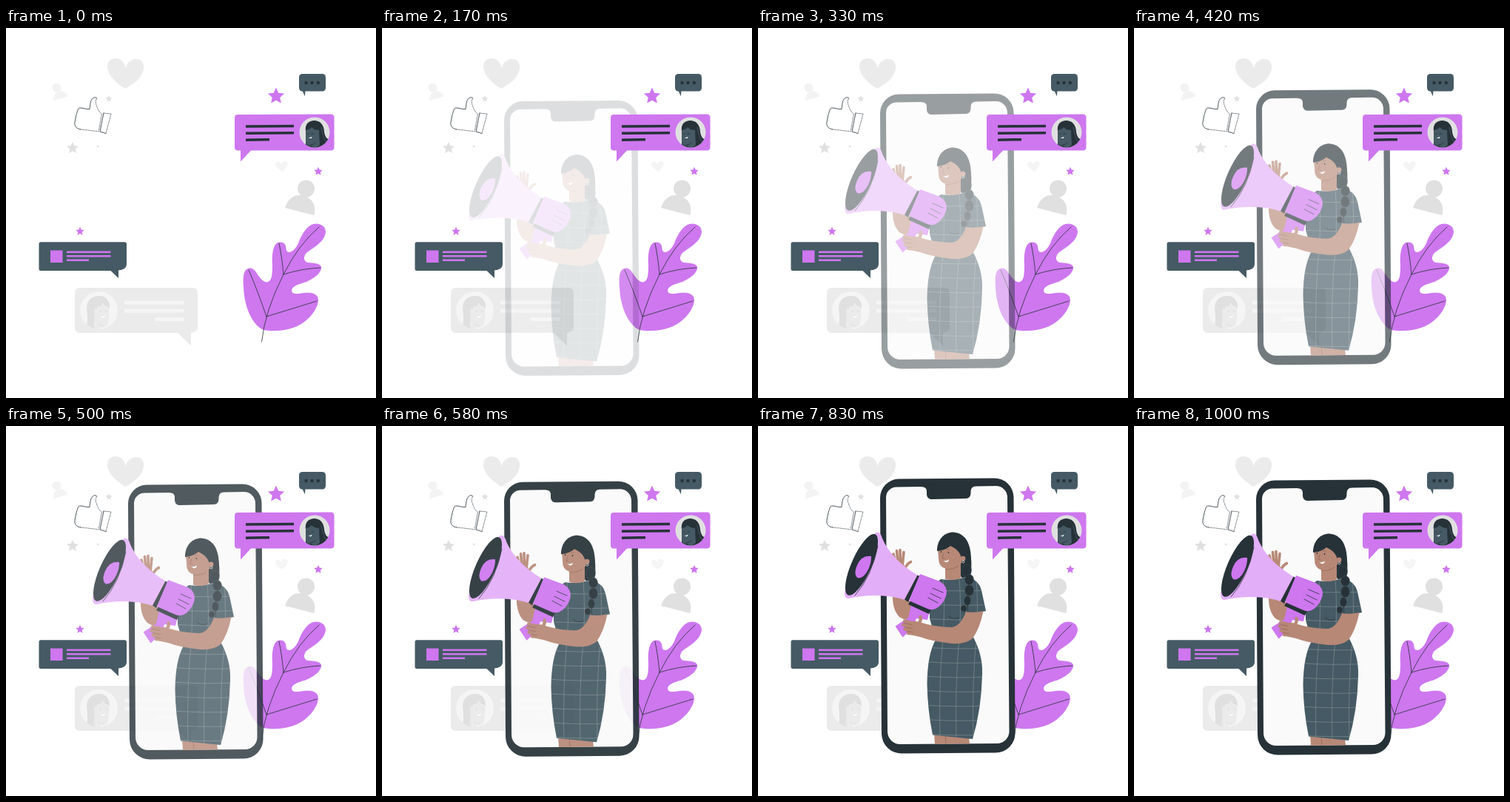
These frames come from a looping animation (500 by 500 pixels, 1040 ms). An HTML page:

```html
<!DOCTYPE html>
<html lang="en">
<head>
<meta charset="utf-8">
<title>Announcement</title>
<style>
  html, body { margin: 0; height: 100%; overflow: hidden; background: #fff; }
  svg { display: block; width: 100vw; height: 100vh; }
  .purple { fill: #ce77ef; }
  .ink { fill: #263238; }
  .slate { fill: #455a64; }
  .skin { fill: #b78876; }
  .line { fill: none; stroke: #263238; stroke-width: .8; stroke-linecap: round; stroke-linejoin: round; }
  .faint { stroke-width: .6; stroke-dasharray: 1.4 1.2; }
  .fingers { fill: none; stroke: #b78876; stroke-width: 3.6; stroke-linecap: round; }
  .grip { stroke-width: 4.4; }
  .crease { fill: none; stroke: #8f6251; stroke-width: .7; stroke-linecap: round; }
</style>
</head>
<body>
<svg viewBox="0 0 500 500">
  <defs>
    <clipPath id="avatar"><circle cx="417" cy="141" r="20.5"/></clipPath>
    <clipPath id="paleAvatar"><circle cx="125.5" cy="381.5" r="25.5"/></clipPath>
    <clipPath id="mouth"><ellipse cx="140" cy="189.300" rx="13.500" ry="45" transform="rotate(24 140 189.300)"/></clipPath>
    <path id="dressShape" d="M247 209Q264 211 278 207L286 207.500Q299 211 302 224L308 252Q297 255 284 254L289 284Q304 310 303 337Q302 385 290 425L236 419.500Q229 385 228.500 350Q229 310 240 291L232 262Q231 238 238 216Z"/>
    <clipPath id="dress"><use href="#dressShape"/></clipPath>
  </defs>

  <!-- hearts and people -->
  <path fill="#ebebeb" d="M161 82C150 75 137 64 137 52C137 44 143 40.500 149 41C156 41.500 160 47 161.500 54C164 46 170 42 176 42C183 42 187 47 186 55C184 68 172 76 161 82Z"/>
  <path fill="#f5f5f5" d="M373.500 193.500C368 191 363.500 187 364 183C365 179 371 180 372 184C373 179.500 379 178 380.500 182C381 187 377 191 373.500 193.500Z"/>
  <g fill="#f3f3f3"><circle cx="68.500" cy="80.500" r="6"/><path d="M64.500 98.500C63 90 68 85 74 85C79 86 83 90 83.500 92.500Z"/></g>
  <g fill="#e0e0e0"><circle cx="405.500" cy="217" r="11.500"/><path d="M377 243C381 230 390 224 401 226.500C413 229 420 239 416.500 253Z"/></g>

  <!-- thumb -->
  <path class="line" d="M101 137C95 136.500 92 132 93 127Q94.500 117 97.500 109.500Q98.500 107.500 102 108Q109 110 113 109.500C114 104 113.500 97 118 94.500Q121.500 92.500 122.500 95"/>
  <path class="line faint" d="M101 137Q111 138 126 140M122.500 95Q120 101 122.500 105Q124 112 129 116M129.500 116L125.500 138M132 115L142 116L135 142.500"/>
  <path class="line" d="M132 115L127 140L135 142.500"/>

  <g id="stars"></g>

  <!-- leaf -->
  <path class="purple" d="M348 408C335 403 322 380 321 350C320 335 321 325 330 324.500C338 324 342 342 352 343.500C359 343 360 335 360 320C359 305 361 290 370 289.500C378 289 378 295 379 301C383 306 390 301 395 291C400 278 408 264 420 264.500C430 265 434 273 431 280C427 291 415 297 407 303C401 308 402 316 408 317C415 318 424 317 426 323C427 330 417 338 408 342C399 346 387 347 386 355C387 361 395 359 403 358C412 357 421 358 422 367C422 380 407 400 385 406C372 410 358 410 348 408Z"/>
  <path class="line" d="M345.500 424Q350 382 375 333Q395 293 423 269M375 333Q373 310 369 291M375 333Q400 325 425 324M352 390Q340 355 328 327M352 390L420 369"/>

  <!-- small dark bubble -->
  <path class="slate" d="M400 84L404 92.500L404.500 84Z"/>
  <rect class="slate" x="396" y="62" width="36" height="23.500" rx="4.500"/>
  <g class="ink"><circle cx="405.500" cy="74" r="2.200"/><circle cx="413.500" cy="74" r="2.200"/><circle cx="421.800" cy="74" r="2.200"/></g>

  <!-- left dark bubble -->
  <path class="slate" d="M47 289.200H160Q163 289.200 163 292V320Q162 327 152 327.500V338L141.500 328H47Q44.500 328 44.500 325.500V292Q44.500 289.200 47 289.200Z"/>
  <path class="purple" d="M60 300.500h16.500v16.500h-16.500ZM82 301.500h59.500v2.400h-59.500ZM82 307h59.500v2.400h-59.500ZM82 312.600h30v2.400h-30Z"/>

  <!-- pale bubble -->
  <path fill="#ebebeb" d="M100 351H252Q259 351 259 358V405Q259 410 250 412V429.500L232 412H100Q93 412 93 405V358Q93 351 100 351Z"/>
  <path fill="#f5f5f5" d="M160 368.500h81v5h-81ZM160 379.800h81v5h-81ZM201 391h40v5h-40Z"/>
  <circle cx="125.500" cy="381.500" r="25.500" fill="#f5f5f5"/>
  <g clip-path="url(#paleAvatar)">
    <path fill="#e0e0e0" d="M109 404Q111 390 109 379C109 368 116 362 126 362C135 362 141 369 140 379L124 376L121 410Z"/>
    <path fill="#ebebeb" d="M119 380Q128 377 131 371Q133 376 139 377Q140 393 137 402Q134 406 128 404V410H119Z"/>
    <path fill="#fff" d="M127 390Q131 391 134 388Q133 394 127 390Z"/>
    <path fill="none" stroke="#d8d8d8" stroke-width=".8" d="M126 383h3M134 382h3M125 400q4 3 7 2"/>
  </g>

  <!-- rising phone and speaker -->
  <g id="rise">
    <path class="ink" d="M165 99A25.500 25.500 0 0 1 190 73.500L319 72.500A26 26 0 0 1 345.500 98L347.500 416A26.500 26.500 0 0 1 321 443.500L195 444.500A27 27 0 0 1 167 418Z"/>
    <path fill="#fafafa" d="M173 98A14 14 0 0 1 187 84.500L220 84Q228 84 228 90V95Q229 101 235 101L281 100Q287 100 287.500 93V90Q288 83.500 294 83.500L321 83A15.500 15.500 0 0 1 337 98L339.500 414A16.500 16.500 0 0 1 323 431L192 432A17 17 0 0 1 175 415Z"/>

    <!-- raised hand and arm -->
    <path class="fingers" d="M186.500 191L183 175M189.500 190L187.500 170.500M192.500 190L192 169.500M195 191L197 172.500M197 197Q201 188 206.500 185.500"/>
    <path class="skin" d="M184.500 188L197 188L201 200L188 198ZM182 228Q181 250 191 260Q200 266 211 263L208 240Z"/>

    <path class="skin" d="M238 417L285 422L286 431.200L239 431.700Z"/>
    <path class="crease" d="M253 420L254 431"/>
    <use href="#dressShape" class="slate"/>
    <path id="plaid" clip-path="url(#dress)" fill="none" stroke="#7f8b90" stroke-width=".7"/>
    <path class="line" d="M258 259Q264 265 272 261M284 254L282 238"/>

    <!-- head -->
    <path class="ink" d="M258 158L284 165Q291 184 287 206L275 207Z"/>
    <path class="skin" d="M253 188L274 184V207.500Q263 212 253 208.500Z"/>
    <path class="skin" d="M243 169Q247 163 255 160L272 160Q279 172 276 186Q268 196 258 195.500Q247 194.500 244.500 186Z"/>
    <path class="crease" d="M254 195.500Q264 196 271 191M251 174L249 180L252 181M246 169l3-1M255 169l4 0"/>
    <path class="ink" d="M242 171C242 155 252 145.500 264 145.500C280 147 289 160 288 188L275 186Q276 171 260 164Q253 170 242 171Z"/>
    <circle class="skin" cx="277" cy="181" r="3.400"/>
    <circle cx="277.500" cy="185.500" r="1.500" fill="none" stroke="#fafafa" stroke-width=".7"/>
    <g class="ink"><circle cx="247.500" cy="172" r=".9"/><circle cx="257.500" cy="173" r=".9"/></g>
    <path fill="#fff" d="M250.500 184Q254.500 185 258 182.500Q256.500 189 250.500 184Z"/>
    <g id="braid" class="ink" stroke="#4d5a60" stroke-width=".4"></g>

    <!-- megaphone -->
    <path class="purple" d="M208 240L232 252L229 264L214 262L210 274L195.500 287.500L185.500 272.500L203 261Z"/>
    <path class="ink" d="M206 238L235 248L231 256Q218 250 203 243Z"/>
    <path fill="#e3aef8" d="M160 145.500Q166 145 168 154Q180 182 216 204L200 237.500Q165 226 122 235Q115 235 118 221Q127 172 160 145.500Z"/>
    <g clip-path="url(#mouth)">
      <path class="ink" d="M100 130h80v120h-80Z"/>
      <path class="purple" d="M153 178Q140 176 134 190Q128.500 203 135 207.500Q143 208 149 196Q153.500 186 153 178Z"/>
    </g>
    <path class="line" d="M162 164Q154 205 131 231"/>
    <path class="ink" d="M215.500 203.500L218.500 205L203 240L198 236.500Z"/>
    <path class="purple" d="M219 202L246 212Q257 219 254.500 230Q251 243 240 249Q234 251.500 228 248.500L204 238Z"/>
    <path class="line" d="M236 221L250 227M233 228L247 235M230 234L243 241"/>

    <!-- holding arm -->
    <path class="skin" d="M281 253Q293 255 304.500 252Q300 275 290 289Q281 297 262 296Q235 293 219 287L205 284Q199 281 200 271Q206 263 218 267Q240 274 262 274Q274 272 281 253Z"/>
    <path class="fingers grip" d="M212 269L198 265.500M210 273L196.500 270.500M210 278L198.500 276.500M213 282L203 282M216 270Q221 265 219.500 260"/>
    <path class="crease" d="M197 268L208 270.500M198 273.500L208 275.500M201 279.500L209 280.500"/>
  </g>

  <!-- purple bubble -->
  <path class="purple" d="M313 117L439 116.500Q443.500 116.500 443.500 121V161Q443.500 165.500 439 165.500H331L317 180.500V165.500H313Q309 165.500 309 161V121.500Q309 117 313 117Z"/>
  <path class="ink" d="M324 131.200L389 130.800V134.300L324 134.700ZM324 140.600L389 140V143.500L324 144.100ZM324 149.400L356 149V152.500L324 152.900Z"/>
  <circle cx="417" cy="141" r="20.500" fill="#e0e0e0"/>
  <g clip-path="url(#avatar)">
    <path class="ink" d="M405 140Q403 126 417 125Q429 126 430 140Q431 150 438 151L430 165H404L405 157Z"/>
    <path class="slate" d="M405 138Q411 137 413 134Q417 138 423 138L424 158L418 162L411 159Q406 159 405 155Z"/>
    <path class="line" d="M407 143h2M413 143h3M411 158q5 0 7-3"/>
    <path fill="#fff" d="M409 148Q411.500 148.500 413.500 146.500Q413 151 409 148Z"/>
    <path fill="none" stroke="#536771" stroke-width=".6" d="M426 134Q429 150 434 157"/>
  </g>
</svg>
<script>
const PERIOD = 1040, FRAMES = 25, RISE = 30;
const el = id => document.getElementById(id);

function star(x, y, r, color) {
  const pts = Array.from({ length: 10 }, (_, i) => {
    const a = i * Math.PI / 5 - Math.PI / 2, d = i % 2 ? r * .48 : r;
    return `${(x + d * Math.cos(a)).toFixed(2)},${(y + d * Math.sin(a)).toFixed(2)}`;
  });
  return `<polygon points="${pts.join(' ')}" fill="${color}"/>`;
}
el('stars').innerHTML = [
  [139, 95.7, 4.6, '#e0e0e0'], [90, 162.3, 8.4, '#e0e0e0'], [124, 160, 2.2, '#e0e0e0'],
  [100, 274.8, 6, '#ce77ef'], [365, 92.2, 11.6, '#ce77ef'], [422, 193.8, 6, '#ce77ef']
].map(s => star(...s)).join('');

el('braid').innerHTML = [
  [282, 197, 6.5, 8], [285.5, 209.5, 6, 7], [285.5, 224, 6, 7.5], [283, 238, 4.5, 6.5], [278, 248.5, 4, 4.5]
].map(([x, y, rx, ry]) => `<ellipse cx="${x}" cy="${y}" rx="${rx}" ry="${ry}"/>`).join('');

let plaid = '';
for (let y = 223; y < 425; y += 19.5) plaid += `M225 ${y}Q265 ${y + 3} 310 ${y + 1}`;
for (const x of [250, 272, 295]) plaid += `M${x} 205Q${x + 3} 250 ${x} 288Q${x - 6} 350 ${x - 4} 430`;
el('plaid').setAttribute('d', plaid);

// cubic-bezier(.36, -.01, .5, 1.38), solved by bisection
function ease(p) {
  if (p >= 1) return 1;
  const curve = (s, a, b) => 3 * (1 - s) ** 2 * s * a + 3 * (1 - s) * s * s * b + s ** 3;
  let lo = 0, hi = 1;
  for (let i = 0; i < 30; i++) {
    const mid = (lo + hi) / 2;
    if (curve(mid, .36, .5) < p) lo = mid; else hi = mid;
  }
  return curve(lo, -.01, 1.38);
}

const start = performance.now();
function draw() {
  const t = (performance.now() - start) % PERIOD;
  const step = Math.min(FRAMES - 1, Math.floor((t + 4) / PERIOD * FRAMES));
  const e = ease((step + 1) / 24.5);
  el('rise').setAttribute('transform', `translate(0 ${(RISE * (1 - e)).toFixed(3)})`);
  el('rise').setAttribute('opacity', step < 2 ? 0 : Math.min(1, e));
  requestAnimationFrame(draw);
}
draw();
</script>
</body>
</html>
```
